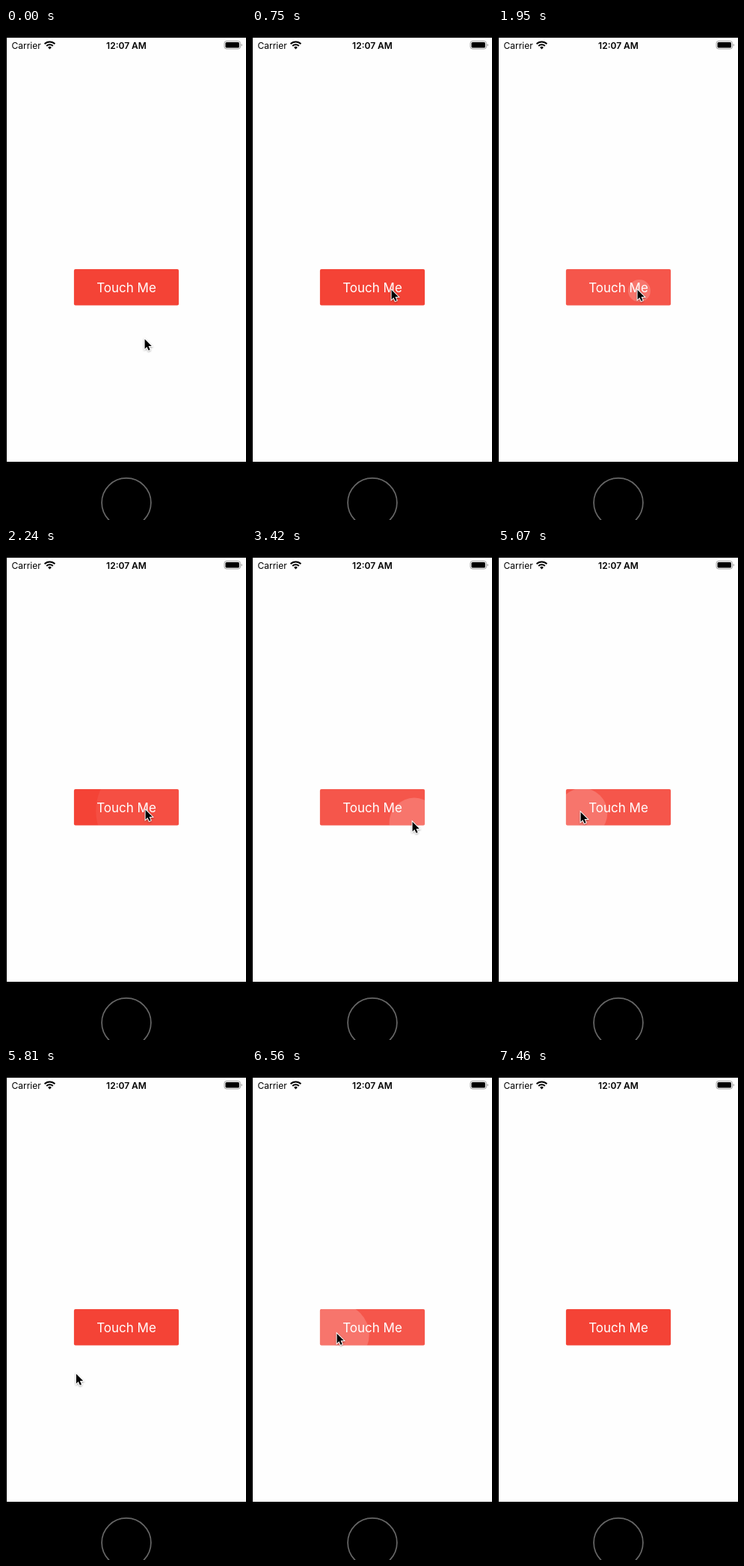
Write an HTML page that moves like this. It is 321 px wide and 659 px high and loops after 7.76 s.

```html
<!DOCTYPE html>
<html lang="en">
<head>
<meta charset="utf-8">
<title>Touch ripple</title>
<style>
  html, body { margin: 0; width: 100%; height: 100%; overflow: hidden; background: #000; }
  svg { display: block; width: 100%; height: 100%; }
  text { font-family: Inter, Roboto, sans-serif; font-size: 12px; }
  .label { font-size: 17px; fill: #fff; }
</style>
</head>
<body>
<svg viewBox="0 0 321 659">
  <defs>
    <clipPath id="buttonShape"><rect x="90.9" y="322.9" width="140.2" height="48.6" rx="2"/></clipPath>
    <filter id="shadow" x="-50%" y="-50%" width="200%" height="200%">
      <feDropShadow dx="0" dy="0.9" stdDeviation="0.8" flood-opacity="0.4"/>
    </filter>
  </defs>
  <rect width="321" height="659"/>
  <rect x="1" y="13" width="320" height="568" fill="#fefefe"/>

  <text x="7.5" y="27.6">Carrier</text>
  <g fill="none" stroke="#000" stroke-width="2">
    <path d="M51.6 21.4A9.75 9.75 0 0 1 65.4 21.4"/>
    <path d="M54.2 24A6.1 6.1 0 0 1 62.8 24"/>
    <path d="M58.5 28.4L56.1 26A3.4 3.4 0 0 1 60.9 26Z" fill="#000" stroke="none"/>
  </g>
  <text x="161" y="27.6" text-anchor="middle" font-weight="600">12:07 AM</text>
  <rect x="292" y="17.5" width="21.5" height="10.5" rx="3" fill="none" stroke="#a3a3a3"/>
  <rect x="293.5" y="19" width="18.5" height="7.5" rx="1.6"/>
  <path d="M314.6 21V24.6Q316 24.2 316 22.8T314.6 21Z" fill="#a3a3a3"/>

  <g clip-path="url(#buttonShape)">
    <rect x="90" y="322" width="142" height="50" fill="#f44336"/>
    <rect id="highlight" x="90" y="322" width="142" height="50" fill="#fff"/>
    <circle id="splash" fill="#fff"/>
  </g>
  <text class="label" x="161" y="353.6" text-anchor="middle">Touch Me</text>

  <circle cx="161" cy="635.8" r="32.9" fill="none" stroke="#666" stroke-width="1.7"/>
  <g id="cursor" filter="url(#shadow)">
    <path transform="translate(.6 .8) scale(.92)" d="M0 0V14L3.1 11.1 5.4 16.3 7.7 15.3 5.4 10.1H10Z"
      stroke="#fff" stroke-width="2" paint-order="stroke"/>
  </g>
</svg>
<script>
const LOOP = 7760;
const TICK = LOOP / 52;
const TICK_LEAD = 13;

// Where the pointer turns or rests; times are in ticks
const stop = (x, y, arrive, leave = arrive) => ({ x, y, arrive, leave });
const STOPS = [
  stop(185, 416, 0),
  stop(194, 370, 1),
  stop(186, 350, 5, 15),
  stop(236, 417, 18),
  stop(214, 366, 21, 24),
  stop(225, 391, 26),
  stop(208, 444, 28),
  stop(110, 353, 32, 35),
  stop(78, 451, 38),
  stop(113, 355, 42, 45),
  stop(258, 595, 47, 48),
  stop(290, 664, 50)
];

const PRESS_TIMES = [1940, 3330, 4972, 6423];
const HOLD = 170;

const [highlight, splash, cursor] = ["highlight", "splash", "cursor"].map(id => document.getElementById(id));
const setAttrs = (el, attrs) => Object.entries(attrs).forEach(([k, v]) => el.setAttribute(k, v));
const clamp = v => Math.min(1, Math.max(0, v));
const fade = (elapsed, duration) => clamp(1 - elapsed / duration);
const easeOut = u => 1 - (1 - u) ** 2;

function pointerAt(tick) {
  const next = STOPS.findIndex(s => s.arrive > tick);
  if (next < 0) return STOPS[STOPS.length - 1];
  const from = STOPS[next - 1], to = STOPS[next];
  const u = easeOut(clamp((tick - from.leave) / (to.arrive - from.leave)));
  return { x: from.x + (to.x - from.x) * u, y: from.y + (to.y - from.y) * u };
}

function drawPress(time) {
  const start = PRESS_TIMES.filter(t => t <= time).pop() ?? -Infinity;
  const age = time - start;
  setAttrs(highlight, { opacity: 0.1 * fade(age - HOLD, 130) });
  setAttrs(splash, { opacity: 0.18 * fade(age - HOLD, 200) });
  if (age === Infinity) return;
  const { x, y } = pointerAt(start / TICK);
  setAttrs(splash, { cx: x + 3, cy: y + 2, r: 15 + 0.18 * age });
}

function render(time) {
  const tick = Math.floor((time + TICK_LEAD) / TICK);
  const { x, y } = pointerAt(tick);
  setAttrs(cursor, { transform: `translate(${x} ${y})` });
  drawPress(tick * TICK);
}

const begin = performance.now();
function loop() {
  render((performance.now() - begin) % LOOP);
  requestAnimationFrame(loop);
}
loop();
</script>
</body>
</html>
```
